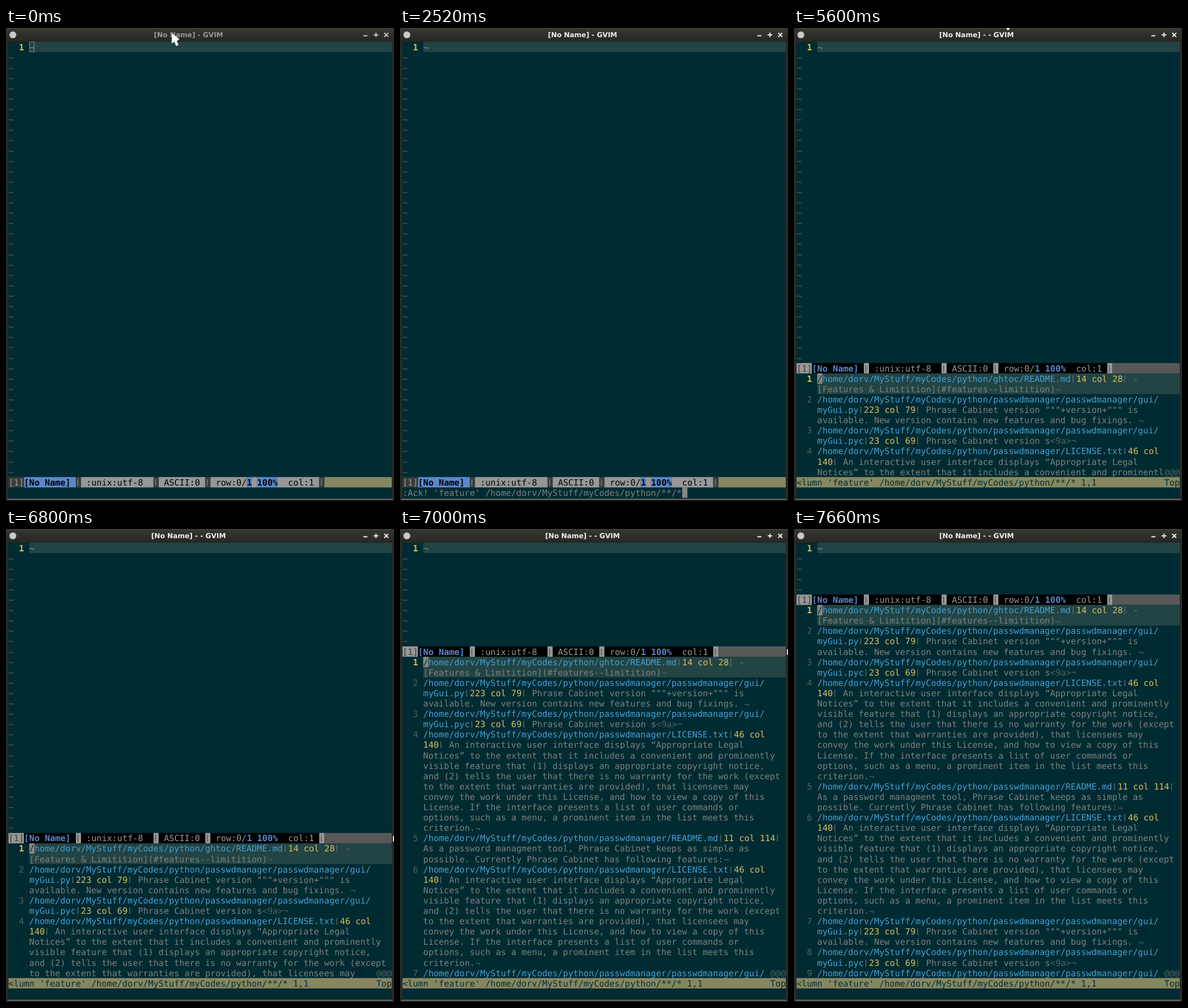
Recreate the animation shown at these times as an HTML page. Size 678 px wide and 826 px high, loop 8 s.

```html
<!DOCTYPE html>
<html lang="en">
<head>
<meta charset="utf-8">
<title>Editor session</title>
<style>
  html, body { margin: 0; width: 100%; height: 100%; overflow: hidden; background: #002b32; }
  svg { display: block; width: 100vw; height: 100vh; }
  text { white-space: pre; text-rendering: geometricPrecision; font-family: "DejaVu Sans Mono", monospace; }
  .title { font: bold 12px "DejaVu Sans", sans-serif; text-anchor: middle; }
</style>
</head>
<body>
<svg id="stage" viewBox="0 0 678 826"></svg>
<script>
const LOOP = 8000, CW = 9.05, CH = 18.1, X0 = 4.4, Y0 = 24, COLS = 74, LAST = 42;
const C = {
  bg: '#002b32', line: '#224444', text: '#7c817e', dim: '#50605f', tilde: '#4a6467',
  path: '#479fd2', num: '#d6c163', cur: '#dfbf55', block: '#878787',
  blue: '#5a87cc', gray: '#979797', dark: '#3c3c3a', black: '#000000', olive: '#87875f', fill: '#585858'
};

// ---- drawing helpers
const esc = s => s.replace(/&/g, '&amp;').replace(/</g, '&lt;');
const rect = (x, y, w, h, fill, extra = '') =>
  `<rect x="${x}" y="${y}" width="${w}" height="${h}" fill="${fill}" ${extra}/>`;
const colX = c => X0 + c * CW;
const rowY = r => Y0 + r * CH;
const cells = (c, r, n, fill, rows = 1) => rect(colX(c), rowY(r), n * CW, CH * rows, fill);

function label(c, r, s, fill, bold) {
  const size = s === '|' ? 12 : 15.03;
  const dy = s === '|' ? -2 : s === '¬' ? 1.5 : 0;
  return `<text x="${colX(c).toFixed(2)}" y="${(rowY(r) + 14.5 + dy).toFixed(2)}" font-size="${size}" ` +
    `fill="${fill}"${bold ? ' font-weight="bold"' : ''}>${esc(s)}</text>`;
}

// ---- search results
const HOME = '/home/dorv/MyStuff/myCodes/python/';
const PM = HOME + 'passwdmanager/';
const APP = 'Phrase Cabinet';
const entry = (path, loc, body, tail = '') =>
  [[path, C.path], ['|', C.text], [loc, C.num], ['|', C.text], [body, C.text], [tail + '¬', C.dim]];

const gui = entry(PM + 'passwdmanager/gui/\nmyGui.py', '223 col 79',
  ` ${APP} version """+version+""" is\navailable. New version contains new features and bug fixings. `);
const guiBin = entry(PM + 'passwdmanager/gui/\nmyGui.pyc', '23 col 69', ` ${APP} version s`, '<9a>');
const license = entry(PM + 'LICENSE.txt', '46 col\n140', ` An interactive user interface displays “Appropriate Legal
Notices” to the extent that it includes a convenient and prominently
visible feature that (1) displays an appropriate copyright notice,
and (2) tells the user that there is no warranty for the work (except
to the extent that warranties are provided), that licensees may
convey the work under this License, and how to view a copy of this
License. If the interface presents a list of user commands or
options, such as a menu, a prominent item in the list meets this
criterion.`);
const entries = [
  entry(HOME + 'ghtoc/README.md', '14 col 28', ' -\n[Features & Limitition](#features--limitition)'),
  gui, guiBin, license,
  entry(PM + 'README.md', '11 col 114',
    `\nAs a password managment tool, ${APP} keeps as simple as\npossible. Currently ${APP} has following features:`),
  license, gui, guiBin, gui
];

// Break entries into screen rows of coloured runs.
const results = entries.flatMap((runs, i) => {
  const rows = [{ n: i + 1, runs: [] }];
  let col = 4;
  for (const [s, fill] of runs) {
    s.split('\n').forEach((part, k) => {
      if (k) { rows.push({ runs: [] }); col = 4; }
      if (part) rows[rows.length - 1].runs.push([col, part, fill]);
      col += part.length;
    });
  }
  rows[rows.length - 1].end = true;
  return rows;
});

function quickfix(top, cursor) {
  let s = cells(4, top, 70, C.line, 2);
  for (let r = top; r < LAST; r++) {
    const row = results[r - top];
    if (!row) break;
    if (row.n) s += label(2, r, String(row.n), row.n === 1 ? C.cur : C.dim, row.n === 1);
    for (const [c, str, fill] of row.runs) s += label(c, r, str, fill);
    if (r === LAST - 1 && !row.end) s += cells(71, r, 3, C.bg) + label(71, r, '@@@', C.dim);
  }
  if (cursor) s += cells(4, top, 1, C.block) + label(4, top, '/', C.bg);
  return s + cells(0, LAST, COLS, C.olive) +
    label(0, LAST, `<lumn 'feature' ${HOME}**/* 1,1`, C.bg) + label(71, LAST, 'Top', C.bg);
}

function statusLine(r, active) {
  let col = 0, s = '';
  const put = (str, ink, paper, bold) => {
    s += cells(col, r, str.length, paper) + label(col, r, str, ink, bold);
    col += str.length;
  };
  const plain = str => active ? put(str, C.black, C.gray) : put(str, C.gray, C.black);
  const strong = str => active ? put(str, C.black, C.blue, true) : put(str, C.blue, C.black, true);
  const edge = str => active ? put(str, C.gray, C.dark) : put(str, C.dark, C.gray);
  edge('[1]'); strong('[No Name] '); edge('|');
  plain(' :unix:utf-8  '); edge('|');
  plain(' ASCII:0 '); edge('|');
  plain(' row:0/'); strong('1'); plain(' '); strong('100%'); plain('  col:1 '); edge('|');
  return s + cells(col, r, COLS - col, active ? C.olive : C.fill);
}

function buffer(status, cursor) {
  let s = cells(4, 0, 70, C.line) + label(2, 0, '1', C.cur, true);
  if (cursor === 'block') s += cells(4, 0, 1, C.block);
  if (cursor === 'hollow')
    s += rect(colX(4) + .5, rowY(0) + .5, CW - 1, CH - 1, 'none', `stroke="${C.block}"`);
  s += label(4, 0, '¬', cursor === 'block' ? C.bg : '#7d8c8a');
  for (let r = 1; r < status; r++) s += label(0, r, '~', C.tilde);
  return s;
}

function chrome(title, focus) {
  const ink = focus ? '#f0f0ee' : '#9a9994', btn = focus ? '#f0f0ee' : '#c4c4c0';
  return rect(0, 0, 678, 24, 'url(#bar)') +
    rect(0, 24, 4, 802, '#2b2a26') + rect(674, 24, 4, 802, '#2b2a26') +
    rect(0, 821, 678, 5, '#1d1f1d') + rect(2, 822.3, 674, 1.4, '#879090') +
    '<path d="M0 0H5Q1 1 0 5ZM678 0H673Q677 1 678 5Z" fill="#28374d"/>' +
    '<circle cx="12" cy="12" r="6" fill="#c9cac6"/>' +
    `<text class="title" x="319" y="16.4" fill="${ink}">${title}</text>` +
    `<path d="M624.5 13.5h7M642.5 12h8M646.5 8v8M661 8.5l7 7m0-7l-7 7" fill="none" stroke="${btn}" stroke-width="1.9"/>`;
}

const arrow = (x, y) =>
  `<path transform="translate(${x} ${y})" d="M.5 0L0 18L4.5 15L8 22.5L12 20.5L9 14L13.5 10.5Z" fill="#fff"/>`;

// ---- timeline
const stepAt = (t, steps) => steps.reduce((v, [at, val]) => t >= at ? val : v, undefined);
const within = (t, spans) => spans.some(([a, b]) => t >= a && t < b);

const HIDDEN = [[920, 1160], [1580, 1800], [3220, 3470], [3870, 4110],
  [5040, 5290], [5730, 5930], [6330, 6580]];
const SPLIT = [[0, LAST], [4260, 31], [6760, 30], [6800, 28], [6840, 25], [6880, 21], [6920, 17],
  [6960, 13], [7000, 10], [7040, 8], [7080, 6], [7170, 5], [7340, 4], [7660, 5]];
const POINTER = [[0, [289.5, 9]], [300, [300, 1]], [370, [318, -12]], [440, null],
  [5600, [365, -18.5]], [5640, [368, -20]], [5730, null]];
const COMMAND = [[0, ''], [2180, ':'], [2520, `:Ack! 'feature' ${HOME}**/*`], [4110, '']];

function scene(t) {
  const focus = t >= 230, split = stepAt(t, SPLIT), open = split < LAST;
  const lit = !within(t, HIDDEN), cmd = stepAt(t, COMMAND), ptr = stepAt(t, POINTER);
  const cursor = !focus ? 'hollow' : lit && t < 2180 ? 'block' : '';
  let s = '<defs><linearGradient id="bar" x2="0" y2="1"><stop stop-color="#484742"/>' +
    '<stop offset=".08" stop-color="#373631"/><stop offset="1" stop-color="#272622"/></linearGradient></defs>' +
    rect(0, 0, 678, 826, C.bg) + buffer(split, cursor) + statusLine(split, !open);
  if (open) s += quickfix(split + 1, lit && t >= 4340);
  if (cmd) s += label(0, 43, cmd, C.text) + (lit ? cells(cmd.length, 43, 1, C.block) : '');
  s += chrome(t < 4190 ? '[No Name] - GVIM' : '[No Name] - - GVIM', focus);
  if (ptr) s += arrow(...ptr);
  if (t >= 6420 && t < 7040) s += rect(676.3, rowY(split) + 5, 1.7, 10, '#fff', 'rx=".8"');
  return s;
}

const stage = document.getElementById('stage');
let shown = '';
function frame(now) {
  const next = scene(now % LOOP);
  if (next !== shown) stage.innerHTML = shown = next;
  requestAnimationFrame(frame);
}
frame(0);
</script>
</body>
</html>
```
